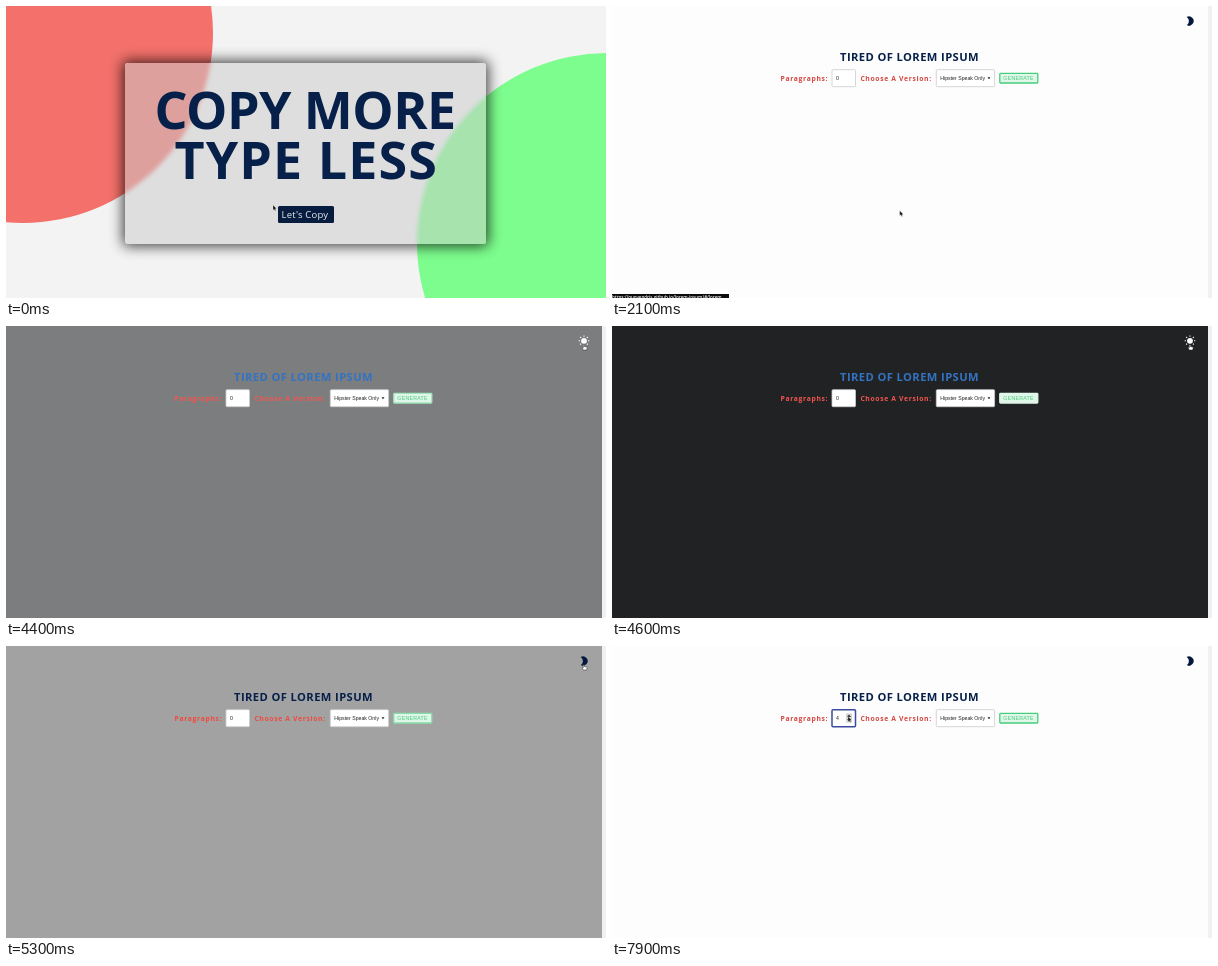
Animation of 600x292 px, one loop 8 s. Source, as an HTML page:

```html
<!DOCTYPE html>
<html lang="en">
<head>
<meta charset="utf-8">
<title>Copy more, type less</title>
<style>
  html, body { margin: 0; width: 100%; height: 100%; overflow: hidden; background: #fff; }
  svg { display: block; width: 100vw; height: 100vh; }
  text { font-family: "Open Sans", "Noto Sans", sans-serif; }
  .ui { font-family: "Liberation Sans", Arial, sans-serif; font-size: 5.2px; fill: #222; }
  .hero { font-size: 52px; font-weight: 700; fill: #06204a; }
  .label { font-size: 6.8px; font-weight: 700; letter-spacing: .65px; }
</style>
</head>
<body>
<svg viewBox="0 0 600 292">
  <defs>
    <clipPath id="cardClip"><rect x="119" y="57" width="361" height="181" rx="3"/></clipPath>
    <filter id="shadow" x="-20%" y="-30%" width="140%" height="160%"><feGaussianBlur stdDeviation="7"/></filter>
    <filter id="soft"><feGaussianBlur stdDeviation="2"/></filter>
    <g id="circles">
      <circle cx="17" cy="27" r="190" fill="#f4716b"/>
      <circle cx="601" cy="237" r="190" fill="#7dfd8d"/>
    </g>
  </defs>

  <g id="landing">
    <rect width="600" height="292" fill="#f3f3f4"/>
    <use href="#circles"/>
    <rect x="117" y="55" width="365" height="185" rx="4" fill="#000" opacity=".75" filter="url(#shadow)"/>
    <g clip-path="url(#cardClip)">
      <rect width="600" height="292" fill="#f3f3f4"/>
      <use href="#circles" filter="url(#soft)"/>
      <rect width="600" height="292" fill="#cbcbcb" opacity=".52"/>
    </g>
    <text class="hero" x="148.5" y="123" letter-spacing="-.55">COPY MORE</text>
    <text class="hero" x="168.5" y="173" letter-spacing="1.1">TYPE LESS</text>
    <rect x="272" y="200" width="56" height="17" rx="1.5" fill="#071d3f"/>
    <text x="275.5" y="212" font-size="9.5" letter-spacing=".2" fill="#e8ecf2">Let's Copy</text>
  </g>

  <g id="app">
    <rect id="page" width="600" height="292"/>
    <rect x="596" width="4" height="292" fill="#f1f1f1"/>
    <text id="title" x="228" y="55" font-size="11.2" font-weight="700" letter-spacing=".4">TIRED OF LOREM IPSUM</text>
    <g id="labels">
      <text class="label" x="168.6" y="74.7">Paragraphs:</text>
      <text class="label" x="248.4" y="74.7">Choose A Version:</text>
    </g>
    <rect id="field" x="220" y="63.7" width="23.5" height="17" rx="1" fill="#fff"/>
    <text id="count" class="ui" x="224" y="74"></text>
    <g id="spinner">
      <rect x="234" y="67.5" width="6" height="9" fill="#d5d5d5"/>
      <path d="M235 71l2-2.4 2 2.4zM235 73l2 2.4 2-2.4z" fill="#333"/>
    </g>
    <rect x="324.3" y="63.7" width="58.3" height="17" rx="1" fill="#fff" stroke="#ccc" stroke-width=".8"/>
    <text class="ui" x="328.3" y="74">Hipster Speak Only</text>
    <path d="M375.5 71.3h3l-1.5 2z" fill="#222"/>
    <rect id="button" x="387.8" y="67.3" width="38" height="9.7" rx=".8" fill="#e0f6e8"/>
    <text class="ui" x="391.3" y="74.1" letter-spacing=".3" style="fill:#45c97c">GENERATE</text>
    <path id="moon" transform="translate(572.2 9.4) scale(.47)" fill="#04183f"
      d="M5 3.35A10 10 0 0 1 5 20.65A10 10 0 1 0 5 3.35Z"/>
    <g id="sun" transform="translate(578 14.8)">
      <circle r="2.9" fill="#fff"/>
      <circle r="4.7" fill="none" stroke="#fff" stroke-width="1.2" pathLength="80" stroke-dasharray="3 7" stroke-dashoffset="1.5"/>
    </g>
  </g>

  <g id="status">
    <rect y="288" width="117" height="4" fill="#0c0c0c"/>
    <text x="0" y="292.8" font-size="4.5" font-weight="600" fill="#eee">https://quovendris.github.io/lorem-ipsum/#/lorem</text>
  </g>

  <g id="cursor">
    <path id="arrow" d="M0 0V5.2L1.2 4.2 2 6 2.9 5.6 2.1 3.8H3.7Z" fill="#111" stroke="#fff" stroke-width=".3"/>
    <path id="hand" d="M-.7 0q.6-.6 1.2 0V1.6L2.6 2q.7.2.6 1L2.6 5H-.6L-2 2.7q.4-.7 1.3 0Z" fill="#fff" stroke="#222" stroke-width=".5"/>
  </g>
</svg>
<script>
const LOOP = 8000, STEP = 100;
const el = id => document.getElementById(id);
const show = (id, on) => el(id).style.display = on ? '' : 'none';
const paint = (id, attrs) => {
  for (const name in attrs) el(id).setAttribute(name, attrs[name]);
};
const mix = (a, b, k) => a + (b - a) * k;
const blend = (a, b, k) => `rgb(${a.map((v, i) => Math.round(mix(v, b[i], k)))})`;

// Pointer path: time, x, y
const track = [
  [0, 267, 199], [700, 288, 204.6], [2100, 287.7, 204.6], [2900, 379, 140.3],
  [3500, 567, 7], [3900, 578, 19], [5500, 578, 19], [6100, 242.8, 72.3],
  [6300, 236, 70.5], [LOOP, 236, 70.5]
];
const clicks = [6500, 6900, 7400, 7900];

function pointerAt(t) {
  const i = track.findIndex(key => key[0] > t);
  const [t0, x0, y0] = track[i - 1], [t1, x1, y1] = track[i];
  const k = (t - t0) / (t1 - t0);
  return [mix(x0, x1, k), mix(y0, y1, k)];
}

// The click lands partway through a step, so the fade is already under way.
const fade = (t, start) => t < start ? 0 : Math.min(1, (t - start + 170) / 290);

function render(time) {
  const t = Math.floor(time / STEP) * STEP;
  const onLanding = t < 2100;
  const night = t >= 4400 && t < 5300;
  const darkness = fade(t, 4400) - fade(t, 5300);
  const focused = t >= clicks[0];

  show('landing', onLanding);
  show('app', !onLanding);
  show('status', t >= 400 && t < 2300);
  show('moon', !night);
  show('sun', night);
  show('spinner', t >= 6200);

  paint('page', { fill: blend([254, 253, 253], [32, 34, 36], darkness) });
  paint('title', { fill: night ? '#3473c2' : '#06204a' });
  paint('labels', { fill: night ? '#f4554f' : darkness ? '#f04a3c' : '#d5463f' });
  paint('field', { stroke: focused ? '#3b4a9e' : '#ccc', 'stroke-width': focused ? 1.5 : .8 });
  paint('button', { stroke: blend([70, 205, 125], [224, 246, 232], darkness), 'stroke-width': 1.3 });
  el('count').textContent = clicks.filter(c => t >= c).length;

  const hand = t >= 400 && onLanding || t >= 3700 && t < 5600;
  show('cursor', t < 3100 || t >= 3500);
  show('arrow', !hand);
  show('hand', hand);
  paint('cursor', { transform: `translate(${pointerAt(t)})` });
}

const start = performance.now();
function tick() {
  render((performance.now() - start) % LOOP);
  requestAnimationFrame(tick);
}
tick();
</script>
</body>
</html>
```
